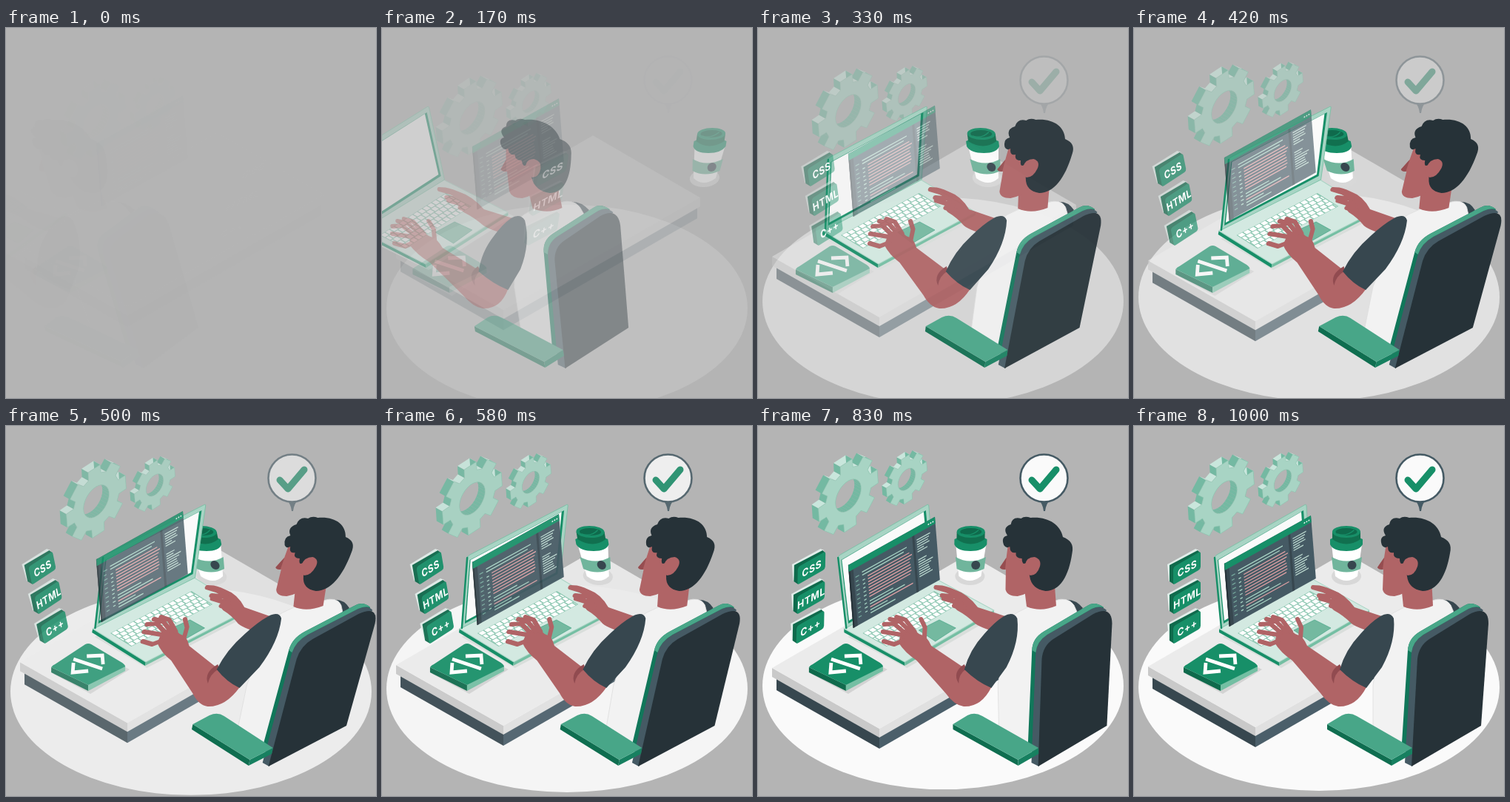
Write an HTML page that moves like this. It is 500 by 500 pixels and loops after 1.04 s.

```html
<!DOCTYPE html>
<html lang="en">
<head>
<meta charset="utf-8">
<title>Coding at a desk</title>
<style>
html, body { margin: 0; height: 100%; overflow: hidden; background: #b4b4b4; }
svg { display: block; width: 100vw; height: 100vh; }
text { font: 700 14px Inter, Roboto, sans-serif; letter-spacing: .6px; fill: #fff; text-anchor: middle; }
.line { fill: none; stroke-linecap: round; stroke-linejoin: round; }
.skin { fill: #b06466; }
.finger { fill: none; stroke: #b06466; stroke-width: 6; stroke-linecap: round; stroke-linejoin: round; }
</style>
</head>
<body>
<svg viewBox="0 0 500 500">
  <ellipse id="floor" cx="250" cy="353" rx="244" ry="140" fill="#fafafa"/>
  <g id="gears"></g>

  <g id="bubble">
    <path d="M379 100H395Q389 105 388 115H386Q385 105 379 100Z" fill="#455a64"/>
    <circle cx="386.5" cy="70.5" r="32" fill="#fafafa" stroke="#455a64" stroke-width="2.6"/>
    <path class="line" d="M370 73L381 85L403 59" stroke="#178f68" stroke-width="9"/>
  </g>

  <g id="desk">
    <path d="M25 338L164 417V434L25 355Z" fill="#37474f"/>
    <path d="M164 417L426 266V283L164 434Z" fill="#4b5f6a"/>
    <path d="M19 325L164 407V419L19 337Z" fill="#c9c9c9"/>
    <path d="M164 407L430 255V267L164 419Z" fill="#e0e0e0"/>
    <path d="M19 325L285 171L430 255L164 407Z" fill="#ebebeb"/>
  </g>

  <g id="cup">
    <ellipse cx="287" cy="203" rx="20" ry="12" fill="#d8d8d8"/>
    <path d="M267 160L272 203Q287 215 302 203L308 160Z" fill="#fff"/>
    <path d="M267 177Q287 188 308 177L306 193Q287 202 269 193Z" fill="#70b59c"/>
    <circle cx="294.5" cy="188" r="6" fill="#37474f"/>
    <path d="M265 153Q287 141 309 153V160Q304 169 287 169Q269 169 265 160Z" fill="#178f68"/>
    <path d="M268 143V153Q287 166 306 153V143Z" fill="#11704f"/>
    <ellipse cx="287" cy="143" rx="19" ry="8" fill="#178f68"/>
    <ellipse cx="287" cy="143" rx="14.5" ry="5" fill="#0f6a4c"/>
    <path class="line" d="M275 146Q287 150 297 141" stroke="#178f68" stroke-width="1.5"/>
  </g>

  <g id="laptop">
    <path d="M120 285L242 215L325 254L199 327Z" fill="#d9dedb"/>
    <path d="M115 274L196 319V324L115 279Z" fill="#178f68"/>
    <path d="M196 319L318 249V253L196 324Z" fill="#74bfa3"/>
    <path d="M115 274L236 204L318 249L196 319Z" fill="#d3e9e1" stroke="#a8d4c4"/>
    <path d="M140 280L238 223L270 241L172 298Z" fill="#8fc8b3"/>
    <g id="keys" transform="matrix(1 -.58 1 .56 140 280)" stroke="#fff" stroke-width="5.2"></g>
    <path d="M216 276L244 262L266 273L238 291Z" fill="#74b9a0" stroke="#48a688" stroke-width=".7"/>
    <path d="M109 178Q109 176 112 174L230 107Q233 105 233 108L239 205L118 273Z" fill="#a8d4c4" stroke="#74bfa3" stroke-width=".8"/>
    <path d="M109 178L118 273" class="line" stroke="#178f68" stroke-width="2.5"/>
    <path d="M113 181L229 114L235 200L121 267Z" fill="#178f68"/>
    <path d="M114 181L226 116L232 198L122 263Z" fill="#fafafa"/>
  </g>

  <g id="panel">
    <g transform="matrix(1 -.556 .08 1 122 186)">
      <rect width="117" height="85" fill="#455a64"/>
      <rect x="85.5" y="9" width="3" height="76" fill="#37474f"/>
      <rect y="9" width="6" height="76" fill="#37474f"/>
      <path d="M.8 0V85" stroke="#263238" stroke-width="2"/>
      <rect width="117" height="9" fill="#178f68"/>
      <path class="line" d="M108 5h0M111 5h0M114 5h0" stroke="#fff" stroke-width="1.8"/>
      <g id="code" fill="none" stroke-width="1.4"></g>
    </g>
  </g>

  <g id="box">
    <path d="M70 335L120 302L173 329L120 362Z" fill="#d3d3d3"/>
    <path d="M67 326L117 350V358L67 333Z" fill="#0f6a4c"/>
    <path d="M117 350L167 324V331L117 358Z" fill="#74bfa3"/>
    <path d="M67 326Q69 323 72 322L113 295Q117 293 121 295L163 320Q167 323 167 325L117 350Z" fill="#178f68"/>
    <path d="M97 320L96 333L117 331M97 315L136 328M115 311L136 310L137 322" fill="none" stroke="#fff" stroke-width="4.8"/>
  </g>

  <g id="man">
    <path d="M410 236Q428 231 440 246L425 262Z" fill="#37474f"/>
    <path d="M240 216Q250 213 267 221Q285 227 298 245L350 262L331 280Q305 275 294 267Q283 256 270 249Q260 240 268 232Z" class="skin"/>
    <path class="finger" d="M270 226L242 218M272 231L250 229M276 240L252 233M280 246L266 243"/>
    <path d="M338 262Q362 240 402 236Q420 230 428 242L440 270L372 440L323 414L323 350Z" fill="#f2f2f2" stroke="#dedede" stroke-width=".8"/>
    <path d="M360 205L364 244Q383 252 404 243L402 205Z" class="skin"/>
    <path d="M341 158L338 178L329 191Q330 194 337 194L336 221Q338 230 352 230Q366 228 374 216L392 190L372 150Z" class="skin"/>
    <path d="M338 178L329 191Q330 194 336 194Z" fill="#964d50"/>
    <path d="M335 161Q331 150 340 148Q333 137 345 133Q347 122 359 125Q364 121 372 124C395 122 412 133 415 150C425 154 430 160 427 172C422 202 410 223 390 223Q371 220 369 203L366 184Q359 190 359 179Q350 179 351 171Q343 173 343 163Q338 166 335 161Z" fill="#263238"/>
    <path d="M363 188Q365 177 376 177Q386 180 383 190Q379 202 370 202Q362 199 363 188Z" class="skin"/>

    <path d="M362 428L370 303Q371 287 386 278L446 243Q456 236 468 245L460 260L400 300L376 460Z" fill="#11775a"/>
    <path d="M366 455L375 306Q377 291 391 282L452 247Q464 241 472 249L440 290L376 460Z" fill="#455a64"/>
    <path d="M370 303Q371 287 386 278L446 243Q456 236 468 245Q460 243 452 247L391 282Q377 291 375 306Z" fill="#48a688"/>
    <path d="M375 460L383 315Q385 297 399 288L454 254Q479 242 479 267L469 405Z" fill="#263238"/>

    <path d="M261 403L348 451V459L261 410Z" fill="#0f6e50"/>
    <path d="M348 451L376 435V443L348 459Z" fill="#178060"/>
    <path d="M261 403L281 391Q291 386 301 392L376 435L348 451Z" fill="#48a688"/>

    <path d="M194 277Q207 271 218 281Q229 284 234 297L281 329L314 353Q300 380 276 379Q263 377 252 361L214 317Q198 306 190 293Z" class="skin"/>
    <path class="finger" d="M196 290L184 295L170 291M194 282L169 278M198 279L184 267L171 268M206 278L192 264L179 261M212 278L200 262L188 258M225 286L226 272L221 261"/>
    <path d="M278 322Q261 333 270 348Q270 335 281 328Z" fill="#914b50"/>
    <path d="M333 257Q346 250 351 260Q354 291 335 326L314 354Q295 346 278 329Q286 302 306 281Q320 265 333 257Z" fill="#37474f"/>
  </g>

  <g id="badges"></g>
</svg>
<script>
const $ = id => document.getElementById(id);

// Gear: side walls as one quad per edge, then the front face.
const iso = (r, a) => [r * Math.cos(a) * .866, r * (Math.sin(a) - .5 * Math.cos(a))];
const ring = pts => 'M' + pts.map(p => p.map(n => n.toFixed(1))).join('L') + 'Z';
function gear(x, y, scale) {
  const outer = [], hole = [], D = [-9, -5];
  for (let i = 0; i < 8; i++)
    for (const [r, d] of [[36, -.27], [47, -.2], [47, .2], [36, .27]])
      outer.push(iso(r, i * Math.PI / 4 - .07 + d));
  for (let i = 0; i < 32; i++) hole.push(iso(20, i * Math.PI / 16));
  const walls = (pts, inside) => pts.map((p, i) => {
    const q = pts[(i + 1) % pts.length];
    const du = (q[0] - p[0]) / .866, dv = q[1] - p[1] + .5 * du;
    const back = ([a, b]) => [a + D[0], b + D[1]];
    const fill = !inside && du > Math.abs(dv) ? '#c9e6dc' : '#74b9a2';
    return `<path d="${ring([p, q, back(q), back(p)])}" fill="${fill}"/>`;
  }).join('');
  return `<g transform="translate(${x} ${y}) scale(${scale})">${walls(outer)}${walls(hole, true)}
    <path d="${ring(outer) + ring(hole)}" fill="#a8d4c4" fill-rule="evenodd" stroke="#8fc4b1" stroke-width=".6"/></g>`;
}
$('gears').innerHTML = gear(122, 96, 1) + gear(201, 74, .68);

// The blocks fade in more slowly than the words on them.
const words = ['CSS', 'HTML', 'C++'];
const block = (_, i) => `<g transform="translate(0 ${i * 40})">
  <path d="M45 187L83 166L88 168L49 189L48 210L47 209Z" fill="#e1eeea"/>
  <path d="M48 188L86 168L90 172L54 193V214L48 210Z" fill="#0f6a4c"/>
  <path d="M53 194Q53 191 56 189L87 171Q90 169 90 173V190Q90 193 87 195L56 213Q53 215 53 211Z" fill="#178f68"/></g>`;
const label = (word, i) => `<text transform="matrix(.866 -.5 0 1 72 ${197.5 + i * 40})">${word}</text>`;
$('badges').innerHTML = `<g id="blocks">${words.map(block).join('')}</g>` + words.map(label).join('');

$('keys').innerHTML = [0, 1, 2, 3, 4].map(i =>
  `<path d="M1 ${3.2 + 6.4 * i}H97" stroke-dasharray="5.4 1.5" stroke-dashoffset="${i * 2}"/>`).join('');

// Lines of code inside the window.
let seed = 7;
const rnd = () => (seed = seed * 16807 % 2147483647) / 2147483647;
const rows = (n, v, step, u, len, color, vary = 0) => {
  let d = '';
  for (let i = 0; i < n; i++) d += `M${u} ${v + i * step}h${(len * (1 - vary * rnd())).toFixed(1)}`;
  return `<path d="${d}" stroke="${color}"/>`;
};
$('code').innerHTML =
  rows(10, 21, 6, 8, 5, '#74a59a', .3) +
  rows(9, 30, 5.4, 17, 4, '#a8d4c4', .3) +
  rows(2, 19, 4, 17, 65, '#a8d4c4', .15) +
  rows(8, 28, 4, 24, 60, '#e0a0a4', .08) +
  rows(2, 62, 4, 24, 58, '#a8d4c4', .5) +
  rows(1, 70, 4, 24, 58, '#e0a0a4') +
  rows(2, 74, 4, 24, 40, '#a8d4c4', .5) +
  rows(6, 17, 3.2, 91, 20, '#b8d5cc', .6) +
  rows(8, 44, 3.2, 91, 20, '#b8d5cc', .6);

// cubic-bezier(.36, -.01, .5, 1.38)
function ease(x) {
  if (x <= 0) return 0;
  if (x >= 1) return 1;
  const curve = (s, a, b) => 3 * (1 - s) ** 2 * s * a + 3 * (1 - s) * s * s * b + s ** 3;
  let lo = 0, hi = 1;
  for (let i = 0; i < 24; i++) {
    const mid = (lo + hi) / 2;
    if (curve(mid, .36, .5) < x) lo = mid; else hi = mid;
  }
  return curve(lo, -.01, 1.38);
}

const STOPS = [0, .6, .8, 1], SKEW = [.364, -.176, .035, 0];
function pose(id, opacity, transform) {
  $(id).setAttribute('opacity', Math.min(1, opacity));
  if (transform) $(id).setAttribute('transform', transform);
}
// Skewed dash in from one side; dir is 1 from the left, -1 from the right.
function dash(id, t, dir, y0) {
  const i = t < .6 ? 0 : t < .8 ? 1 : 2;
  const p = ease((t - STOPS[i]) / (STOPS[i + 1] - STOPS[i]));
  const skew = dir * (SKEW[i] + (SKEW[i + 1] - SKEW[i]) * p);
  const dx = i ? 0 : dir * -252 * (1 - p);
  pose(id, i ? 1 : p, `matrix(1 0 ${skew} 1 ${dx - skew * y0} 0)`);
}
function slide(id, p, dx, dy) {
  pose(id, p, `translate(${dx * (1 - p)} ${dy * (1 - p)})`);
}

function draw(ms) {
  let step = Math.min(24, Math.floor((ms + 4) * .024));
  if (step === 1) step = 0; // the opening pose is held twice as long
  const t = Math.min(1, (step + .8) / 24), p = ease(t);
  slide('floor', p, 0, 30);
  slide('gears', p, 0, 30);
  slide('desk', p, 0, -30);
  slide('panel', p, 0, -30);
  slide('box', p, -30, 0);
  pose('bubble', Math.max(0, p) ** 2.5);
  pose('blocks', p);
  dash('man', t, 1, 291);
  dash('laptop', t, 1, 214);
  dash('cup', t, -1, 175);
  dash('badges', t, -1, 230);
}

const start = performance.now();
function tick() {
  draw((performance.now() - start) % 1040);
  requestAnimationFrame(tick);
}
tick();
</script>
</body>
</html>
```
